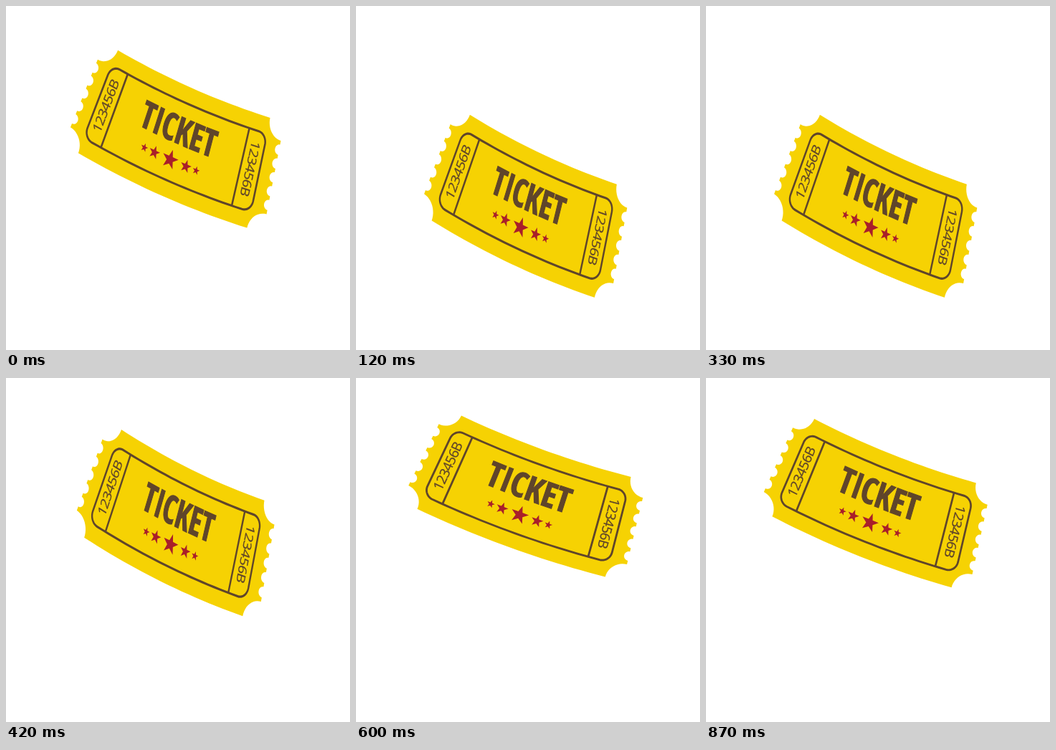
Recreate the animation shown at these times as an HTML page. Size 480 by 480 pixels, loop 0.9 s.

```html
<!DOCTYPE html>
<html lang="en">
<head>
<meta charset="utf-8">
<title>Bouncing ticket</title>
<style>
  html, body { margin: 0; width: 100%; height: 100%; overflow: hidden; background: #fff; }
  svg { display: block; width: 100vw; height: 100vh; }
  .paper { fill: #f6d203; }
  .line { fill: none; stroke: #5f452b; stroke-width: 2.8; }
  .star { fill: #a91f2a; }
  text { fill: #5f452b; stroke: #5f452b; text-anchor: middle; font-family: "Open Sans", "Noto Sans", sans-serif; }
  .title { font-family: "Open Sans Condensed", "Open Sans", sans-serif; font-size: 48px; font-weight: 700; font-stretch: 75%; stroke-width: 1.1; }
  .serial { font-size: 19px; letter-spacing: -0.9px; stroke-width: 0.25; }
</style>
</head>
<body>
<svg viewBox="0 0 480 480">
  <g id="ticket">
    <path id="paper" class="paper"/>
    <path id="frame" class="line"/>
    <path id="dividers" class="line"/>
    <path id="stars" class="star"/>
    <path id="baseline" fill="none"/>
    <text class="title"><textPath href="#baseline" startOffset="50%">TICKET</textPath></text>
    <text id="serialL" class="serial" y="6.8">123456B</text>
    <text id="serialR" class="serial" y="6.8">123456B</text>
  </g>
</svg>
<script>
const $ = id => document.getElementById(id);
const TAU = Math.PI * 2;

// The flat ticket is bent along a large circle and tilted.
const TILT = 19.85, RADIUS = 1400, CENTER = { x: 714.5, y: -1148.1 };
const tilt = TILT * Math.PI / 180;

function bend([x, y]) {
  const r = RADIUS + y, a = tilt - x / RADIUS;
  return [CENTER.x - r * Math.sin(a), CENTER.y + r * Math.cos(a)];
}

const toPath = pts => 'M' + pts.map(p => bend(p).map(v => v.toFixed(2)).join(' ')).join('L');

function line(x0, y0, x1, y1, n = 24) {
  return Array.from({ length: n + 1 }, (_, i) => [x0 + (x1 - x0) * i / n, y0 + (y1 - y0) * i / n]);
}

// Angles are in quarter turns, clockwise from the right.
function arc(cx, cy, r, from, to, n = 12) {
  return Array.from({ length: n + 1 }, (_, i) => {
    const a = (from + (to - from) * i / n) * TAU / 4;
    return [cx + r * Math.cos(a), cy + r * Math.sin(a)];
  });
}

function paper() {
  const w = 157, h = 72, notch = 24.2, pitch = 18, bite = 6.6;
  const half = [...line(notch - w, -h, w - notch, -h), ...arc(w, -h, notch, 2, 1)];
  for (let i = -2; i <= 2; i++) half.push(...arc(w, i * pitch, bite, 3, 1));
  half.push(...arc(w, h, notch, 3, 2));
  return toPath([...half, ...half.map(([x, y]) => [-x, -y])]) + 'Z';
}

function frame() {
  const w = 133.5, h = 51, r = 14;
  return toPath([
    ...line(r - w, -h, w - r, -h), ...arc(w - r, r - h, r, -1, 0),
    ...arc(w - r, h - r, r, 0, 1), ...line(w - r, h, r - w, h),
    ...arc(r - w, h - r, r, 1, 2), ...arc(r - w, r - h, r, 2, 3)
  ]) + 'Z';
}

function star(x, y, size) {
  const pts = Array.from({ length: 10 }, (_, i) => {
    const r = i % 2 ? size * 0.4 : size, a = i * TAU / 10;
    return [x + r * Math.sin(a), y - r * Math.cos(a)];
  });
  return toPath(pts) + 'Z';
}

function place(el, x, y, turn) {
  const [px, py] = bend([x, y]);
  const angle = TILT - x / RADIUS * 360 / TAU + turn;
  el.setAttribute('transform', `translate(${px} ${py}) rotate(${angle})`);
}

$('paper').setAttribute('d', paper());
$('frame').setAttribute('d', frame());
$('dividers').setAttribute('d', [-105, 103.8].map(x => toPath(line(x, -51, x, 51, 1))).join(''));
$('stars').setAttribute('d', [[-42, 5.7], [-25.5, 8.8], [0, 13], [25.5, 8.8], [42, 5.7]]
  .map(([x, size]) => star(x - 2.5, 24.7, size)).join(''));
$('baseline').setAttribute('d', toPath(line(-102.5, 1.8, 97.5, 1.8)));
place($('serialL'), -119.8, 0, -90);
place($('serialR'), 119, -1.7, 90);

// Bounce: knots run from the lowest point to the highest, two steps apart.
const LOOP = 900, STEP = 30, LOWEST = 240, REST = { x: 236.2, y: 164.5 };
const HEIGHT = [336, 302, 253, 201.4, 174, 165.7, 164.4, 164.2];
const STRETCH = [-0.129, 0.057, 0.184, 0.157, 0.046, 0.006, 0, 0];

function spline(knots, u) {
  const last = knots.length - 1;
  const at = i => knots[last - Math.abs(last - Math.abs(i))];
  const i = Math.floor(u), f = u - i;
  const [a, b, c, d] = [at(i - 1), at(i), at(i + 1), at(i + 2)];
  return b + f / 2 * (c - a + f * (2 * a - 5 * b + 4 * c - d + f * (3 * (b - c) + d - a)));
}

function draw() {
  const t = performance.now() % LOOP;
  const mid = Math.floor(t / STEP) * STEP + STEP / 2;
  const gap = Math.abs(mid - LOWEST);
  const u = (Math.min(gap, LOOP - gap) - STEP / 2) / STEP / 2;
  const y = spline(HEIGHT, u), e = spline(STRETCH, u);
  $('ticket').setAttribute('transform',
    `translate(${REST.x} ${y}) scale(${1 - e} ${1 + e}) translate(-236.5 ${-REST.y})`);
  requestAnimationFrame(draw);
}
draw();
</script>
</body>
</html>
```
